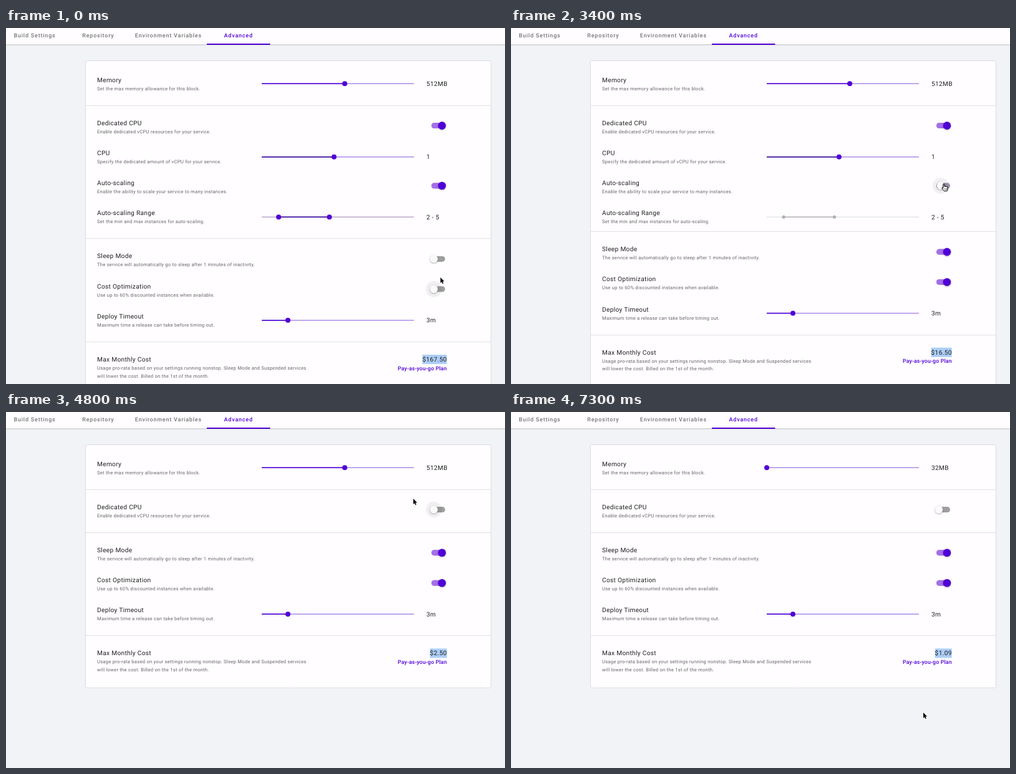
These frames come from a looping animation (800 px wide and 571 px high, 7.5 s). An HTML page with a canvas:

```html
<!DOCTYPE html>
<html lang="en">
<head>
<meta charset="utf-8">
<title>Block settings</title>
<style>
  html, body { margin: 0; width: 100%; height: 100%; overflow: hidden; background: #f2f3f6; }
  canvas { display: block; }
</style>
</head>
<body>
<canvas id="stage" width="800" height="571"></canvas>
<script>
const ctx = document.getElementById('stage').getContext('2d');
const LOOP = 7500, STEP = 100, ROW = 48.2;
const PURPLE = '#5000d6', PALE = '#a883e6', SURFACE = '#fffdff', LINE = '#e0e0e4';
const MEMORY = [32, 64, 128, 192, 256, 384, 512];
const TRACK_X = 410, TRACK_W = 244;

// Pointer tip: time, x, y
const POINTER = [
  [0, 696.5, 400], [400, 690, 416], [1200, 690, 416], [1600, 687, 378],
  [2300, 687, 378], [2700, 694, 276], [3100, 694, 250], [3500, 694, 250],
  [4000, 694, 181], [4200, 694, 162], [4500, 694, 162], [4800, 653, 139],
  [5200, 544, 93], [5650, 544, 92], [5900, 493, 92], [6000, 468, 92],
  [6600, 404, 93], [6800, 404, 93], [7300, 661, 482]
];
const HAND_TIMES = [[300, 1300], [1600, 2400], [3000, 3600], [4100, 4600], [5100, 6900]];
const ARROW = new Path2D('M0 0V9L2 7.2L3.4 10.3L4.8 9.7L3.5 6.6H6.2Z');
const HAND = new Path2D('M-1.1 7V.9Q-1.1 0-.2 0Q.7 0 .7.9V4Q4 4 6.1 5.3V8Q6 10 5 11.5H.4Q-1 9.5-2.9 7.5Q-3.4 6.2-2.3 6.2Z');
const FINGERS = new Path2D('M1.4 7.4V9.6M3 7.4V9.6M4.5 7.4V9.6');

const smooth = p => (p = Math.min(1, Math.max(0, p)), p * p * (3 - 2 * p));
const ease = (t, start, length) => smooth((t - start) / length);
const during = (t, from, to) => t >= from && t < to;

function pointerAt(t) {
  const i = POINTER.findIndex(k => k[0] >= t);
  if (i < 0) return POINTER.at(-1).slice(1);
  if (i === 0) return POINTER[0].slice(1);
  const [t0, x0, y0] = POINTER[i - 1], [t1, x1, y1] = POINTER[i];
  const p = (t - t0) / (t1 - t0);
  return [x0 + (x1 - x0) * p, y0 + (y1 - y0) * p];
}

function text(str, x, y, size, { color = '#212121', weight = 400, spacing = 0.031, align = 'left' } = {}) {
  ctx.font = `${weight} ${size}px Roboto, sans-serif`;
  ctx.letterSpacing = `${spacing * size}px`;
  ctx.textRendering = 'geometricPrecision';
  ctx.textAlign = align;
  ctx.fillStyle = color;
  ctx.fillText(str, x, y);
}

function rect(x, y, w, h, color) {
  ctx.fillStyle = color;
  ctx.fillRect(x, y, w, h);
}

function disc(x, y, r, color) {
  ctx.fillStyle = color;
  ctx.beginPath();
  ctx.arc(x, y, r, 0, 7);
  ctx.fill();
}

// y is the middle of the row title
function label(title, y, ...lines) {
  text(title, 146, y + 3.6, 10.16);
  lines.forEach((line, i) => text(line, 146, y + 16.6 + 12.6 * i, 7.62, { color: '#666', spacing: 0.0333 }));
}

function toggle(y, on, ripple) {
  const x = 686 + 13 * on;
  ctx.beginPath();
  ctx.roundRect(682, y - 4.5, 22, 9, 4.5);
  ctx.fillStyle = '#9e9e9e';
  ctx.fill();
  ctx.globalAlpha = on;
  ctx.fillStyle = '#a56eea';
  ctx.fill();
  ctx.globalAlpha = 1;
  if (ripple) disc(x, y, 13, on > 0.5 ? 'rgba(80,0,214,.05)' : 'rgba(0,0,0,.055)');
  ctx.shadowColor = 'rgba(0,0,0,.35)';
  ctx.shadowBlur = 2.5;
  ctx.shadowOffsetY = 0.8;
  disc(x, y, 6.3, on > 0.5 ? PURPLE : '#fafafa');
  ctx.shadowColor = 'transparent';
}

function slider(y, stops, value, { fill = PURPLE, rest = PALE, enabled = true } = {}) {
  const xs = stops.map(s => TRACK_X + TRACK_W * s);
  const from = xs.length > 1 ? xs[0] : TRACK_X;
  rect(TRACK_X, y - 0.7, TRACK_W, 1.4, enabled ? rest : '#e2e2e5');
  rect(from, y - 0.8, xs.at(-1) - from, 1.6, enabled ? fill : '#b8b8ba');
  xs.forEach(x => disc(x, y, enabled ? 4 : 2.6, enabled ? PURPLE : '#b0b0b2'));
  text(value, 674, y + 3.5, 10.16);
}

function bubble(x, y, value) {
  disc(x, y, 12.5, 'rgba(80,0,214,.2)');
  disc(x, y, 4, PURPLE);
  ctx.save();
  ctx.translate(x, y - 21.5);
  ctx.rotate(Math.PI / 4);
  ctx.beginPath();
  ctx.roundRect(-10, -10, 20, 20, [10, 10, 0, 10]);
  ctx.fillStyle = PURPLE;
  ctx.fill();
  ctx.restore();
  text(value, x, y - 18.5, 8, { color: '#fff', weight: 500, align: 'center' });
}

function header() {
  rect(0, 0, 800, 571, '#f2f3f6');
  rect(0, 0, 800, 26.5, SURFACE);
  rect(0, 26.5, 800, 1, '#bcbcc0');
  const tabs = [['Build Settings', 46], ['Repository', 147.8], ['Environment Variables', 260.3], ['Advanced', 372.7]];
  tabs.forEach(([name, x], i) => text(name, x, 14.6, 8.97, {
    color: i === 3 ? PURPLE : '#757575', weight: 500, spacing: 0.0893, align: 'center'
  }));
  rect(322, 25, 101.5, 2, PURPLE);
}

function pointer(t) {
  const hand = HAND_TIMES.some(([from, to]) => during(t, from, to));
  ctx.save();
  ctx.translate(...pointerAt(t));
  ctx.lineJoin = 'round';
  ctx.lineWidth = hand ? 1 : 1.6;
  ctx.strokeStyle = hand ? '#111' : '#fff';
  ctx.fillStyle = hand ? '#fff' : '#000';
  ctx.stroke(hand ? HAND : ARROW);
  ctx.fill(hand ? HAND : ARROW);
  if (hand) {
    ctx.stroke(HAND);
    ctx.lineWidth = 0.7;
    ctx.stroke(FINGERS);
  }
  ctx.restore();
}

function draw(t) {
  const optimized = ease(t, 540, 160);
  const sleeping = ease(t, 1900, 160);
  const scaling = 1 - ease(t, 3290, 160);
  const dedicated = 1 - ease(t, 4450, 160);
  const rangeOpen = 1 - ease(t, 3290, 350);
  const cpuOpen = 1 - ease(t, 4450, 300);

  const dragging = during(t, 5300, 6900);
  const dragX = pointerAt(Math.min(t, 6800) - 100)[0];
  const level = t < 5300 ? 6 : Math.max(0, Math.round((dragX - TRACK_X) / TRACK_W * 11));
  const memory = MEMORY[level];
  const cost = t < 600 ? 167.5 : t < 3300 ? 82.5 : t < 4500 ? 16.5 : 1 + 1.5 * memory / 512;

  const split = 193 + ROW * cpuOpen * (2 + rangeOpen);
  const shift = split - 337.6;

  header();
  ctx.beginPath();
  ctx.roundRect(127.5, 52.5, 650, 534.5 + shift, 2);
  ctx.fillStyle = SURFACE;
  ctx.fill();
  ctx.strokeStyle = '#dcdce1';
  ctx.lineWidth = 1;
  ctx.stroke();
  for (const y of [124, split, 503.3 + shift]) rect(128, Math.round(y - 0.5), 649, 1, LINE);

  label('Memory', 83, 'Set the max memory allowance for this block.');
  slider(89.3, [level / 11], memory + 'MB');
  label('Dedicated CPU', 152, 'Enable dedicated vCPU resources for your service.');
  toggle(156.6, dedicated, during(t, 4200, 4900));

  // Collapsible rows
  ctx.save();
  ctx.beginPath();
  ctx.rect(128, 180, 649, Math.max(0, split - 190));
  ctx.clip();
  if (cpuOpen > 0) {
    label('CPU', 200.2, 'Specify the dedicated amount of vCPU for your service.');
    slider(206.8, [0.475], '1', { fill: '#36089a', enabled: t < 4500 });
    label('Auto-scaling', 248.4, 'Enable the ability to scale your service to many instances.');
    toggle(253, scaling, during(t, 3000, 3700));
    if (rangeOpen > 0) {
      label('Auto-scaling Range', 296.6, 'Set the min and max instances for auto-scaling.');
      slider(303.2, [1 / 9, 4 / 9], '2 - 5', { fill: '#36089a', rest: '#b7a2ca', enabled: t < 3300 });
    }
  }
  ctx.restore();

  ctx.save();
  ctx.translate(0, shift);
  label('Sleep Mode', 365.8, 'The service will automatically go to sleep after 1 minutes of inactivity.');
  toggle(370.4, sleeping, during(t, 1600, 2400));
  label('Cost Optimization', 414, 'Use up to 60% discounted instances when available.');
  toggle(418.8, optimized, t < 1300);
  label('Deploy Timeout', 462.2, 'Maximum time a release can take before timing out.');
  slider(468.8, [0.172], '3m');
  label('Max Monthly Cost', 531.5,
    'Usage pro-rata based on your settings running nonstop. Sleep Mode and Suspended services',
    'will lower the cost. Billed on the 1st of the month.');
  const price = '$' + cost.toFixed(2);
  ctx.font = '10.16px Roboto, sans-serif';
  ctx.letterSpacing = '.315px';
  const width = ctx.measureText(price).width;
  rect(706.7 - width, 524, width, 15, '#accef7');
  text(price, 706.7, 535.1, 10.16, { align: 'right' });
  text('Pay-as-you-go Plan', 706.7, 548.7, 8.75, { color: PURPLE, weight: 500, spacing: 0.0178, align: 'right' });
  ctx.restore();

  if (dragging) bubble(TRACK_X + TRACK_W * level / 11, 89.3, memory);
  pointer(t);
}

function frame() {
  const t = performance.now() % LOOP;
  draw(Math.floor(t / STEP) * STEP);
  requestAnimationFrame(frame);
}
frame();
</script>
</body>
</html>
```
